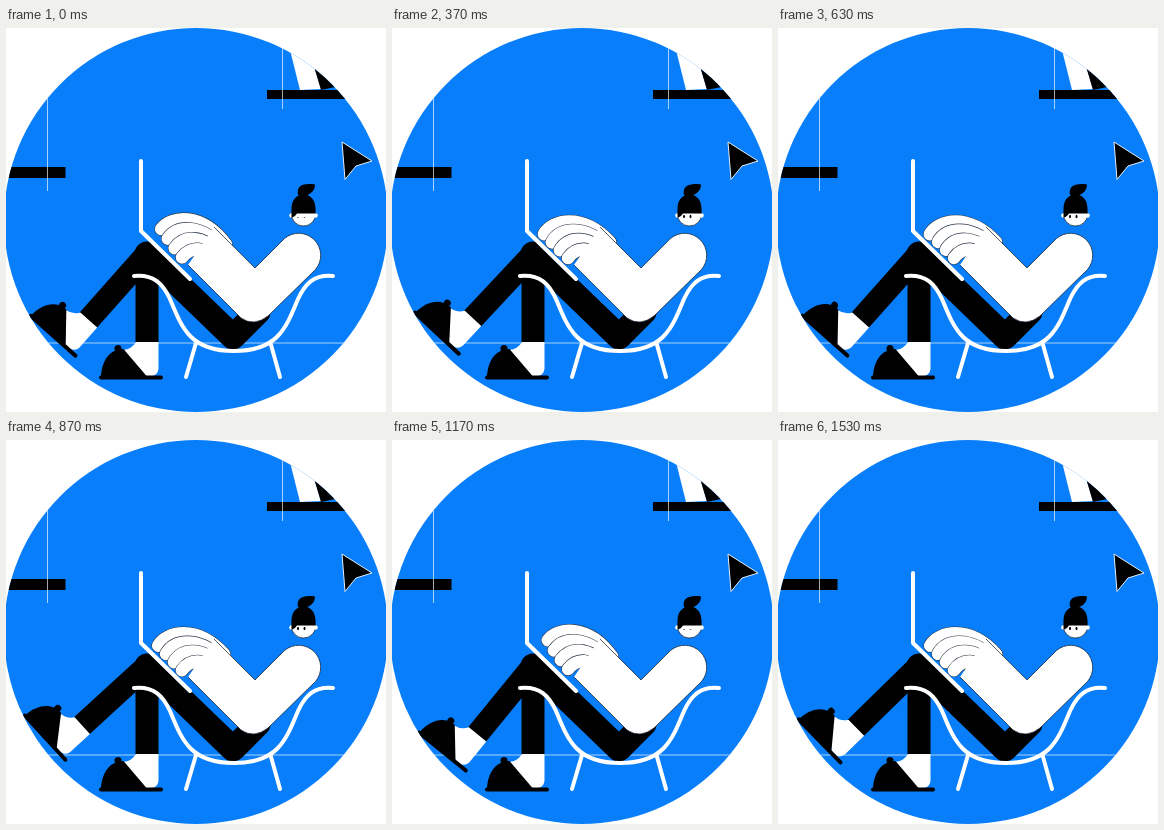
An HTML page that plays this animation: 380 by 384 pixels, repeating every 1.56 s.

```html
<!DOCTYPE html>
<html>
<head>
<meta charset="utf-8">
<style>
  html, body { margin: 0; width: 100%; height: 100%; overflow: hidden; background: #fff; }
  svg { display: block; width: 380px; height: 384px; }
  .white { fill: #fff; }
  .line { fill: none; stroke: #fff; stroke-width: 4; stroke-linecap: round; stroke-linejoin: round; }
  .hair { stroke: #fff; stroke-width: 1; opacity: .65; }
  .outline { stroke: #0b1626; stroke-width: .7; stroke-linejoin: round; }
  .finger path { fill: none; stroke: #fff; stroke-width: 12.6; stroke-linecap: round; }
  .finger path:first-child { stroke: #2c3848; stroke-width: 13.8; }
</style>
</head>
<body>
<svg viewBox="0 0 380 384">
  <defs>
    <clipPath id="disc"><circle cx="190" cy="192" r="192"/></clipPath>
    <g id="leg">
      <path d="M141 226V314.500" stroke="#000" stroke-width="23"/>
      <circle cx="141" cy="226" r="11.5"/>
      <path class="white" d="M130 314H152.500V341Q151.500 347 146 348H140L117 322Q126 321 130 314Z"/>
      <path d="M95 348C96 332 104 321 117.500 321L140.500 348Z"/>
      <circle cx="112" cy="320.500" r="3.5"/>
      <path d="M95 349.500H155" stroke="#000" stroke-width="4" stroke-linecap="round"/>
    </g>
  </defs>
  <g clip-path="url(#disc)">
    <rect width="380" height="384" fill="#087efb"/>
    <path class="hair" d="M20 315H360"/>

    <!-- shelves -->
    <path d="M0 139H59.500V150H0ZM261 62H345V71H261Z"/>
    <path class="white" d="M283 18L294 62L315 61L308 38L312 18Z"/>
    <path d="M308.500 40L315 62L334 58Z"/>
    <path class="hair" d="M41.500 60V163M276.500 15V81"/>

    <!-- legs and chair -->
    <path d="M141 226L227 309L252 284" fill="none" stroke="#000" stroke-width="25" stroke-linecap="round" stroke-linejoin="round"/>
    <use href="#leg"/>
    <use href="#leg" id="swing"/>
    <path class="line" d="M128 248C148 246 157 256 164 271C176 300 184 323 228 323C272 323 280 300 292 271C299 256 308 246 327 248M190 315L180 349M264.500 315L274 349"/>

    <!-- arms -->
    <g id="hand"></g>
    <path class="white outline" d="M208 199L249 240L278.500 210.500A22 22 0 0 1 309.500 241.500L262 288Q248 299 235 290L182 237"/>
    <path class="line" d="M135 133V203L184 251"/>

    <!-- head -->
    <ellipse class="white outline" cx="297.500" cy="186.500" rx="12" ry="11.500"/>
    <circle class="white" cx="285.500" cy="187.500" r="2.300"/>
    <circle class="white" cx="309.500" cy="187.500" r="2.300"/>
    <path d="M285.500 190V180C286 171 291 166.500 297.500 166.500S309 171 309.500 180V185.500H291Q289 189 285.500 190Z"/>
    <path d="M292 167C290 157 298 155 309 156.500C309 163 304 167 297 168Z"/>
    <g id="eyes"><ellipse cx="292" cy="188.500" rx="1" ry="1.800"/><ellipse cx="298.500" cy="188.500" rx="1" ry="1.800"/></g>
  </g>
  <path d="M336 114L366 133L350 138L339 151.500Z" stroke="#e4effb" stroke-width="1"/>
</svg>
<script>
  const LOOP = 1560;
  const $ = id => document.getElementById(id);

  // Lower-leg swing: [time, degrees] at each turning point.
  const swingKeys = [[-130, 37.2], [190, 49.4], [505, 39.2], [850, 47.6], [1170, 39.2], [1500, 45.8], [1820, 39]];

  const fingers = [
    "M152 206C160 192 190 184 218 214",
    "M160 214C168 200 190 196 216 218",
    "M168 222C176 209 194 206 216 226",
    "M176 230C184 219 198 217 214 234"
  ];
  $("hand").innerHTML = fingers.map(d => `<g class="finger"><path d="${d}"/><path d="${d}"/></g>`).join("");
  const fingerNodes = [...$("hand").children];

  const ease = u => (1 - Math.cos(Math.PI * u)) / 2;

  function swingAngle(t) {
    const i = swingKeys.findIndex(key => key[0] > t);
    const [t0, a0] = swingKeys[i - 1], [t1, a1] = swingKeys[i];
    return a0 + (a1 - a0) * ease((t - t0) / (t1 - t0));
  }

  // Smooth bump of the given half width around a moment.
  const bump = (t, centre, width) => ease(Math.max(0, 1 - Math.abs(t - centre) / width));

  function draw(t) {
    $("swing").setAttribute("transform", `rotate(${swingAngle(t)} 141 226)`);

    const lift = bump(t, 0, 130) * .8 + bump(t, 1170, 130);
    fingerNodes.forEach((node, i) => {
      const angle = lift * (8 - 2 * i) + .5 * Math.sin(t / 110 + i);
      node.setAttribute("transform", `rotate(${angle} 198 232)`);
    });

    const closed = t < 60 || Math.abs(t - 1170) < 60;
    $("eyes").setAttribute("transform", closed ? "translate(0 151.6) scale(1 .2)" : "");
  }

  function tick() {
    draw(performance.now() % LOOP);
    requestAnimationFrame(tick);
  }
  tick();
</script>
</body>
</html>
```
